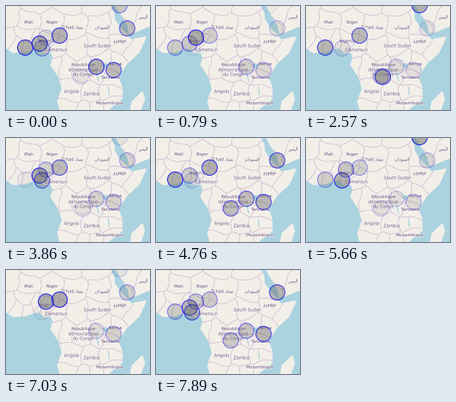
A matplotlib script that plays this animation: 180 px wide and 130 px high, repeating every 7990 ms.

```python
import numpy as np
import matplotlib.pyplot as plt
from matplotlib.animation import FuncAnimation
from matplotlib.patches import Circle, Ellipse, PathPatch
from matplotlib.path import Path
from matplotlib.patheffects import withStroke

W, H, DPI = 180, 130, 100
PX = 72 / DPI
FRAMES, INTERVAL = 170, 47
HOLD, STEP = 0.2, 0.0986
LIFE = 1.8
RADIUS = 9.6

SEA, LAND, BORDER, LABEL = "#aad3df", "#f2efe9", "#d6c1d6", "#7a5f80"


def project(points):
    """Web Mercator: (lon, lat) pairs to stage pixels."""
    lon, lat = np.array(points, float).T
    merc = np.degrees(np.arcsinh(np.tan(np.radians(lat))))
    return np.column_stack([30.2 + 2.85 * lon, 71.5 - 2.85 * merc])


AFRICA = [
    (-13, 8), (-7.5, 4.4), (-2, 4.8), (2.7, 6.35), (4.4, 6.3), (6, 4.3),
    (9, 4.6), (9.8, 2.5), (8.8, -0.8), (12.3, -6), (13.8, -11), (11.8, -16.5),
    (13.5, -22), (35, -22), (34.8, -19.8), (40.5, -15.5), (40.5, -10.5),
    (38.9, -6), (42.5, -0.4), (48, 4.7), (51.2, 11.8), (44.3, 10.4),
    (43, 12.3), (39.5, 15.5), (37.2, 19), (37, 21.5), (34.3, 27), (-13, 27),
]
ARABIA = [
    (35.8, 27), (39, 22), (42.6, 16.5), (43.4, 12.8), (45.5, 13.1), (54, 16.5), (54, 27),
]
MADAGASCAR = [(49.3, -12), (50.4, -15.5), (48, -22), (43.5, -22), (44.4, -16.6)]

# Visual-order Arabic presentation forms.
CHAD_AR = "\uFEA9\uFE8E\uFEB8\uFE97"
SUDAN_AR = "\uFEE5\uFE8D\uFEA9\uFEEE\uFEB4\uFEDF\uFE8D"
YEMEN_AR = "\uFEE6\uFEE4\uFEF4\uFEDF\uFE8D"
COUNTRIES = [
    (28.5, 20.5, "Mali"), (57.5, 20.5, "Niger"), (83, 27, "Tchad " + CHAD_AR),
    (120, 27, SUDAN_AR), (171.5, 14, YEMEN_AR), (51, 44, "Nigeria"),
    (63, 55, "Cameroun"), (114.5, 50, "South Sudan"), (142, 45, "λ†PŘP"),
    (136.5, 72.5, "Kenya"), (96.5, 79.5, "République\ndémocratique\ndu Congo"),
    (130.5, 89.5, "Tanzania"), (82, 107, "Angola"), (107, 110, "Zambia"),
    (129.5, 121.5, "Mozambique"),
]
# Rough centres of the countries without a label.
UNLABELLED = [
    (-10, 10), (-5.5, 7.5), (-1, 8), (-1.5, 12.5), (2, 9.5), (-10, 20), (3, 26),
    (17, 26), (29, 26), (20.5, 6.5), (15, -1), (11.5, -0.7), (32.5, 1.5),
    (30, -2), (30, -3.5), (38.5, 15.5), (46, 5), (34, -13), (29.5, -19),
    (17, -20), (23.5, -21), (45, 22),
]

# Marker place, seconds of its first flash, seconds between flashes.
SITES = [
    (24, 52, 2.3, 2.37), (42, 47, 3.8, 3.85), (45, 53, 1.21, 2.1),
    (50, 39.5, 0.77, 2.06), (67, 37, 1.0, 1.2), (151.5, 28, 1.1, 1.63),
    (142, -1, 2.37, 3.2), (113, 76, 1.3, 1.47), (134.5, 80, 1.2, 1.6),
    (96, 88.5, 2.4, 5.6), (93.5, 88, 1.38, 2.85),
]

fig = plt.figure(figsize=(W / DPI, H / DPI), dpi=DPI, facecolor=SEA)
ax = fig.add_axes([0, 0, 1, 1])
ax.set(xlim=(0, W), ylim=(H, 0))
ax.axis("off")


def closed_path(outline):
    points = project(outline)
    return Path(np.vstack([points, points[:1]]), closed=True)


def draw_land():
    outlines = [closed_path(o) for o in (AFRICA, ARABIA, MADAGASCAR)]
    land = PathPatch(Path.make_compound_path(*outlines), fc=LAND, ec="none", zorder=1)
    return ax.add_patch(land)


def draw_borders(land):
    """Each country takes the ground nearest its centre; a wobble bends the borders."""
    centres = np.vstack([[c[:2] for c in COUNTRIES], project(UNLABELLED)])
    x, y = np.meshgrid(np.arange(-20, W + 20), np.arange(-20, H + 20))
    u = x + 1.5 * np.sin(y / 4)
    v = y + 1.5 * np.sin(x / 5)
    dist = np.array([np.hypot(u - cx, v - cy) for cx, cy in centres])
    for i, own in enumerate(dist):
        nearest_other = np.delete(dist, i, axis=0).min(axis=0)
        lines = ax.contour(x, y, own - nearest_other, [0], colors=BORDER,
                           linewidths=0.6 * PX, zorder=2)
        lines.set_clip_path(land)


def draw_lakes():
    lakes = [(33, -1, 6, 6, 0), (29.6, -6, 1.5, 14, -15), (34.5, -12, 1.4, 13, -5)]
    for lon, lat, w, h, angle in lakes:
        centre = project([(lon, lat)])[0]
        ax.add_patch(Ellipse(centre, w, h, angle=angle, fc=SEA, zorder=2.5))


def draw_labels():
    halo = [withStroke(linewidth=1.2 * PX, foreground="#ffffffaa")]
    for x, y, text in COUNTRIES:
        ax.text(x, y, text, size=5.4 * PX, color=LABEL, ha="center", va="center",
                family="DejaVu Sans", path_effects=halo, zorder=3)


draw_borders(draw_land())
draw_lakes()
draw_labels()
markers = [ax.add_patch(Circle((x, y), RADIUS, lw=1.1 * PX, zorder=4))
           for x, y, *_ in SITES]


def update(frame):
    time = (frame + 1) * INTERVAL / 1000
    time = 0 if time <= HOLD else HOLD + (time - HOLD) // STEP * STEP
    for marker, (_, _, first, period) in zip(markers, SITES):
        strength = max(0, 1 - (time - first) % period / LIFE)
        marker.set_facecolor((0.38, 0.38, 0.38, 0.48 * strength))
        marker.set_edgecolor((0.05, 0.05, 0.95, 0.9 * strength))
    return markers


anim = FuncAnimation(fig, update, frames=FRAMES, interval=INTERVAL,
                     repeat=True, repeat_delay=0)
plt.show()
```
